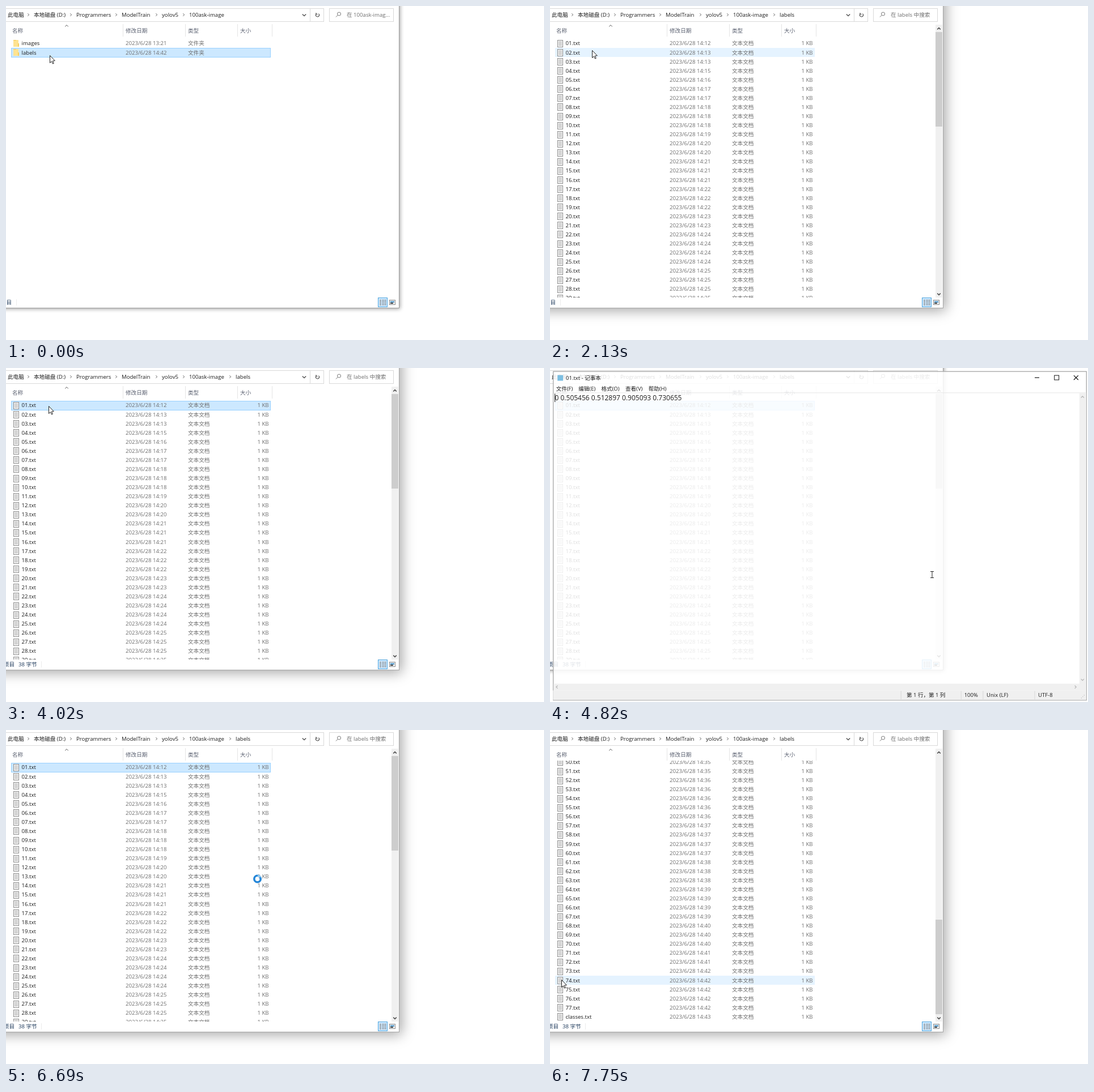
Write an HTML page with a canvas that moves like this. It is 949 px wide and 590 px high and loops after 8 s.

```html
<!DOCTYPE html>
<html lang="zh">
<head>
<meta charset="utf-8">
<style>
html, body { margin: 0; width: 100%; height: 100%; overflow: hidden; background: #fff; }
canvas { display: block; }
</style>
</head>
<body>
<canvas id="stage" width="949" height="590"></canvas>
<script>
const ctx = document.getElementById('stage').getContext('2d');
const W = 949, H = 590, LOOP = 8000;
const FAMILY = '"Open Sans","Noto Sans CJK SC","Noto Sans CJK JP","Noto Sans CJK",sans-serif';
const ROW = 16.07, FIRST = 66, MAX_SCROLL = 797;
const GRAY = '#6d6d6d', INK = '#1c1c1c';

// Each step changes only the listed parts of the screen state.
const STEPS = [
  [0, { view: 'folders', sel: 1, hover: -1, scroll: 0, active: false, pad: '', caret: true, cur: 'arrow', x: 77, y: 87 }],
  [260, { x: 76, y: 86 }],
  [540, { active: true, x: 73, y: 82 }],
  [1610, { view: 'blank', cur: 'busy' }],
  [1870, { view: 'files', sel: -1 }],
  [2130, { cur: 'arrow', x: 74, y: 78, hover: 1 }],
  [2410, { x: 75, y: 67, hover: 0 }],
  [2680, { sel: 0, hover: -1 }],
  [4280, { x: 480, y: 150 }],
  [4550, { x: 670, y: 348 }],
  [4820, { active: false, pad: 'opening', cur: 'beam', x: 674, y: 365 }],
  [5080, { pad: 'open' }],
  [5350, { caret: false, x: 805, y: 210 }],
  [5620, { cur: 'arrow', x: 900, y: 62 }],
  [5880, { caret: true, x: 925, y: 30 }],
  [6140, { pad: 'closing', y: 27 }],
  [6410, { pad: '', x: 700, y: 130 }],
  [6690, { active: true, cur: 'wait', x: 443.5, y: 263 }],
  [6970, { cur: 'arrow', x: 240, y: 330, scroll: 145, hover: 25 }],
  [7220, { x: 90, y: 410, scroll: 482, hover: 51 }],
  [7480, { x: 22, y: 440, scroll: MAX_SCROLL, hover: 73 }],
  [7750, { x: 20, y: 441 }]
];

// Number of files saved in each minute, from 14:12 on.
const files = [];
[...'12011231233244222232322254343251'].forEach((n, i) => {
  for (let k = 0; k < +n; k++) {
    const name = files.length < 77 ? String(files.length + 1).padStart(2, '0') : 'classes';
    files.push({ name: name + '.txt', date: '2023/6/28 14:' + (12 + i), type: '文本文档', size: '1 KB' });
  }
});
const folders = [['images', '13:21'], ['labels', '14:42']].map(([name, time]) =>
  ({ name, date: '2023/6/28 ' + time, type: '文件夹', size: '', folder: true }));

function rect(x, y, w, h, fill, stroke) {
  if (fill) { ctx.fillStyle = fill; ctx.fillRect(x, y, w, h); }
  if (stroke) {
    ctx.strokeStyle = stroke;
    ctx.lineWidth = 1;
    ctx.strokeRect(x + .5, y + .5, w - 1, h - 1);
  }
}

function text(s, x, y, color = INK, size = 9.6, align = 'left') {
  ctx.font = size + 'px ' + FAMILY;
  ctx.textAlign = align;
  ctx.fillStyle = color;
  ctx.fillText(s, x, y + size * .36);
}

function path(points, color, width = 1) {
  ctx.beginPath();
  points.forEach(([x, y]) => ctx.lineTo(x, y));
  ctx.strokeStyle = color;
  ctx.lineWidth = width;
  ctx.stroke();
}

// Chevron pointing along (dx, dy).
function chevron(x, y, dx, dy, color, r = 3, width = 1.2) {
  const h = r / 2;
  path([[x - dx * h - dy * r, y - dy * h - dx * r], [x + dx * h, y + dy * h],
    [x - dx * h + dy * r, y - dy * h + dx * r]], color, width);
}

function ring(x, y, r, width, color, from = 0, to = 2 * Math.PI) {
  ctx.beginPath();
  ctx.arc(x, y, r, from, to);
  ctx.strokeStyle = color;
  ctx.lineWidth = width;
  ctx.stroke();
}

function shadowBox(x, y, w, h, blur, shift, alpha, border) {
  ctx.save();
  ctx.shadowColor = `rgba(0,0,0,${alpha})`;
  ctx.shadowBlur = blur;
  ctx.shadowOffsetX = ctx.shadowOffsetY = shift;
  rect(x, y, w, h, '#fff');
  ctx.restore();
  rect(x, y, w, h, null, border);
}

function addressBar(inside) {
  rect(-2, 4, 563, 24, '#fff', '#d9d9d9');
  rect(536, 4, 1, 24, '#d9d9d9');
  const crumbs = [['此电脑', 3], ['本地磁盘 (D:)', 49], ['Programmers', 124], ['ModelTrain', 204],
    ['yolov5', 275], ['100ask-image', 323]];
  if (inside) crumbs.push(['labels', 405]);
  crumbs.forEach(([s, x], i) => {
    text(s, x, 15.5);
    if (i) chevron(x - 9.5, 15.5, 1, 0, '#555', 2.2, 1);
  });
  chevron(526, 16, 0, 1, '#555', 3.2, 1.4);
  ring(549.5, 16, 3, 1.2, '#555', -.9, 4);
  path([[547, 12], [547, 14.5], [549.5, 14.5]], '#555', 1.2);
  rect(570, 4, 114, 24, '#fff', '#d9d9d9');
  ring(587.5, 14, 3, 1, '#777');
  path([[585.3, 16.2], [582, 19.5]], '#777');
  text(inside ? '在 labels 中搜索' : '在 100ask-imag...', 601, 15.8, GRAY);
}

function header() {
  [['名称', 11], ['修改日期', 211], ['类型', 321], ['大小', 413]]
    .forEach(([s, x]) => text(s, x, 43.5, '#5a6070'));
  [206, 316, 408, 469].forEach(x => rect(x, 32, 1, 22, '#e5e5e5'));
  chevron(107, 35, 0, -1, '#555', 2.8, 1);
}

function fileIcon(y) {
  rect(13, y - 6, 10, 13, '#fafafa', '#8c8c8c');
  for (let k = 0; k < 4; k++) rect(15, y - 3.5 + k * 2.2, 6, 1, '#a8a8a8');
}

function folderIcon(y) {
  rect(13, y - 6, 9, 12, '#ffe391');
  rect(13, y - 6, 5, 1, '#f2c84f');
  rect(21, y, 2, 6, '#f5cf62');
}

function list(items, s) {
  ctx.save();
  ctx.beginPath();
  ctx.rect(0, 54, 680, 461);
  ctx.clip();
  items.forEach((f, i) => {
    const y = FIRST + i * ROW - s.scroll;
    if (y < 44 || y > 525) return;
    const top = Math.round(y - 8);
    if (i === s.sel) rect(9, top, 458, 17, '#cce8ff', '#99d1ff');
    else if (i === s.hover) rect(9, top, 458, 16, '#e5f3ff');
    (f.folder ? folderIcon : fileIcon)(Math.round(y));
    text(f.name, 27.5, y);
    text(f.date, 211, y, GRAY);
    text(f.type, 321, y, GRAY);
    text(f.size, 463.5, y, GRAY, 9.6, 'right');
  });
  ctx.restore();
}

function scrollbar(scroll) {
  rect(680, 33, 12, 482, '#f0f0f0');
  rect(680, 46 + scroll / MAX_SCROLL * 289, 12, 167, '#cdcdcd');
  chevron(686, 40, 0, -1, '#505050', 2.8, 1.5);
  chevron(686, 509, 0, 1, '#505050', 2.8, 1.5);
}

function statusBar(s) {
  const picked = s.view === 'files' && s.sel >= 0;
  const blue = '#1e395b';
  text('个项目', picked ? 15 : 10, 523.5, blue, 9.6, 'right');
  if (picked) text('38 字节', 22, 523.5, blue);
  rect(picked ? 62 : 18, 518, 1, 11, '#ececec');
  rect(656, 515, 17, 17, '#cce8ff', '#4da3dc');
  for (let k = 0; k < 4; k++) {
    const y = 519 + k * 2.7;
    rect(659, y, 3, 1.4, '#8a8a8a');
    rect(663.5, y, 3, 1.2, '#777');
    rect(667.5, y, 3, 1.2, '#777');
  }
  rect(676, 519, 11, 9, '#f6f6f6', '#8c8c8c');
  rect(678, 521, 7, 3, '#6fa8d0');
  rect(678, 524, 5, 2, '#444');
}

function explorer(s) {
  if (s.active) shadowBox(-60, -60, 754, 594, 22, 4, .36, '#a6a6a6');
  else shadowBox(-60, -60, 754, 594, 7, 1, .4, '#9c9c9c');
  addressBar(s.view === 'files');
  if (s.view !== 'blank') {
    header();
    list(s.view === 'files' ? files : folders, s);
  }
  if (s.view === 'files') scrollbar(s.scroll);
  statusBar(s);
}

function captionButtons() {
  path([[858.5, 14.5], [866.5, 14.5]], '#111', 1.2);
  rect(893, 10, 9, 9, null, '#111');
  path([[928, 10.5], [936, 18.5]], '#111', 1.2);
  path([[936, 10.5], [928, 18.5]], '#111', 1.2);
}

function padStatus() {
  rect(1, 572, 949, 17, '#f0f0f0');
  [620, 727, 766, 858].forEach(x => rect(x, 573, 1, 15, '#d7d7d7'));
  [['第 1 行，第 1 列', 630.4], ['100%', 733], ['Unix (LF)', 772.7], ['UTF-8', 864.5]]
    .forEach(([t, x]) => text(t, x, 580.6));
  for (let k = 0; k < 3; k++) rect(946 - k * 2.5, 580 + k * 2.5, 1.2, 1.2, '#bbb');
}

function notepad(s) {
  ctx.save();
  if (s.pad === 'opening') {
    // The sheet fades in over the list, so it is filled without a shadow.
    ctx.translate(475, 295);
    ctx.scale(.991, .991);
    ctx.translate(-475, -295);
    rect(1, 3, 950, 587, 'rgba(255,255,255,.86)', '#8a8a8a');
  } else {
    shadowBox(1, 3, 950, 587, 8, 0, .35, '#777');
  }
  rect(9, 10, 10, 10, '#7dbfe2');
  text('01.txt - 记事本', 24, 15);
  [['文件(F)', 6.5], ['编辑(E)', 46.5], ['格式(O)', 87], ['查看(V)', 130], ['帮助(H)', 171]]
    .forEach(([t, x]) => text(t, x, 34.3));
  rect(2, 41, 947, 1, '#e6e6e6');
  rect(938, 42, 12, 530, '#f0f0f0');
  rect(2, 560, 947, 12, '#f0f0f0');
  chevron(943.5, 49, 0, -1, '#b4b4b4', 2.6);
  chevron(943.5, 553, 0, 1, '#b4b4b4', 2.6);
  chevron(8, 566, -1, 0, '#b4b4b4', 2.6);
  chevron(931, 566, 1, 0, '#b4b4b4', 2.6);
  text('0 0.505456 0.512897 0.905093 0.730655', 4.3, 50.7, INK, 12.1);
  if (s.caret) rect(4, 43, 1, 15, '#000');
  if (s.pad !== 'closing') {
    captionButtons();
    padStatus();
  }
  ctx.restore();
}

function arrow(x, y) {
  ctx.beginPath();
  [[0, 0], [0, 13], [3, 10.3], [5, 14.6], [6.8, 13.8], [4.9, 9.5], [8.8, 9.2]]
    .forEach(([dx, dy]) => ctx.lineTo(x + .5 + dx, y + .5 + dy));
  ctx.closePath();
  ctx.fillStyle = '#fff';
  ctx.fill();
  ctx.strokeStyle = '#222';
  ctx.lineWidth = 1;
  ctx.stroke();
}

function cursor({ cur, x, y }) {
  if (cur === 'beam') {
    rect(x - .5, y - 6, 1, 12, '#222');
    rect(x - 3, y - 6, 6, 1, '#222');
    rect(x - 3, y + 5, 6, 1, '#222');
  } else if (cur === 'wait') {
    ring(x, y, 5.7, 3.6, '#2486d8');
    ring(x, y, 5.7, 3.2, '#8cc8f2', -1.5, -.5);
  } else {
    arrow(x, y);
    if (cur === 'busy') ring(x + 10.8, y + .5, 4.4, 3.2, '#3a98e0');
  }
}

function stateAt(t) {
  return Object.assign({}, ...STEPS.filter(([at]) => at <= t).map(([, change]) => change));
}

function draw(t) {
  const s = stateAt(t);
  rect(0, 0, W, H, '#fff');
  explorer(s);
  if (s.pad) notepad(s);
  cursor(s);
}

const start = performance.now();
function tick() {
  draw((performance.now() - start) % LOOP);
  requestAnimationFrame(tick);
}
tick();
</script>
</body>
</html>
```
